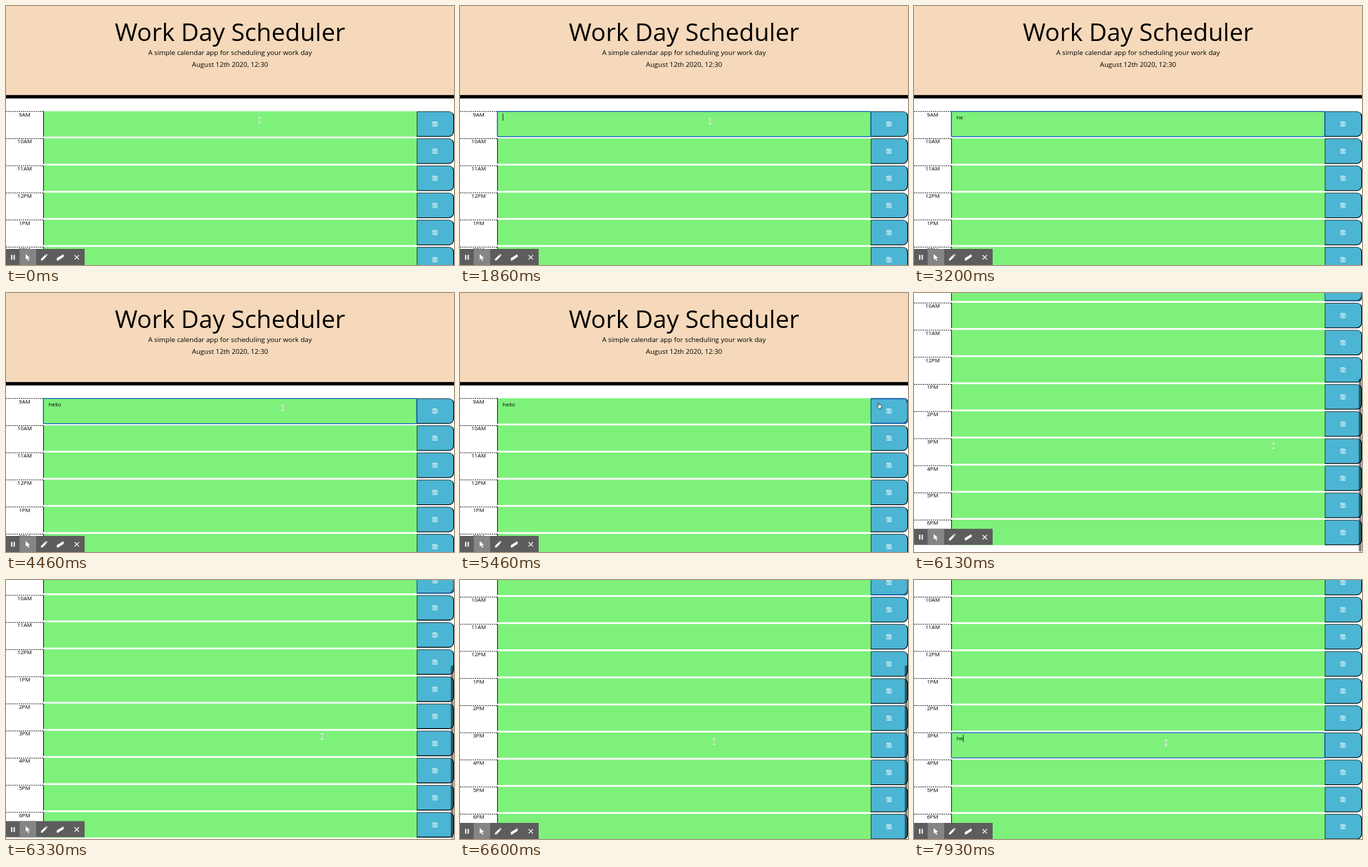
Animation of 638 by 370 pixels, one loop 8000 ms. Source, as an HTML page:

```html
<!DOCTYPE html>
<html lang="en">
<head>
<meta charset="utf-8">
<title>Work Day Scheduler</title>
<style>
  html, body { margin: 0; width: 100%; height: 100%; overflow: hidden; background: #fff; }
  svg { display: block; width: 638px; height: 370px; }
  text { font-family: "Open Sans", "Noto Sans", sans-serif; fill: #000; white-space: pre; }
  .mid { text-anchor: middle; }
  .small { font-size: 7.75px; }
  .lead { font-size: 9.69px; }
  .ring { fill: none; stroke: #1763c6; stroke-width: 1.2; }
</style>
</head>
<body>
<svg viewBox="0 0 638 370">
  <defs>
    <g id="disk" fill="none" stroke="#fff" stroke-width=".8">
      <path d="M-3.1-3.1H2L3.1-2V3.1H-3.1Z"/>
      <path d="M-1.7-3V-1H1.5V-3"/>
      <circle cy="1.1" r="1"/>
    </g>
    <g id="save">
      <path d="M585 .4H630.5a7 7 0 0 1 7 7V29a7 7 0 0 1-7 7H585Z" fill="#4bb5d3"/>
      <path d="M585.4 36V.5H630.5a7 7 0 0 1 5 2" fill="none" stroke="#333" stroke-width=".9"/>
      <path d="M585 35.8H630.5a7 7 0 0 0 7-7V7.4a7 7 0 0 0-2-5" fill="none" stroke="#000" stroke-width="1.1"/>
      <use href="#disk" x="611" y="18.2"/>
    </g>
  </defs>
  <rect width="638" height="370" fill="#fff"/>
  <g id="page">
    <rect width="638" height="127.2" fill="#f5d9ba"/>
    <rect y="127.2" width="638" height="4.9"/>
    <text class="mid" x="319" y="50" font-size="34.9">Work Day Scheduler</text>
    <text class="mid lead" x="319" y="69.6">A simple calendar app for scheduling your work day</text>
    <text class="mid lead" x="319" y="87.2">August 12th 2020, 12:30</text>
    <g id="rows"></g>
    <rect id="fieldRing" class="ring" x="53.3" width="531.6" height="36" rx="1"/>
    <path id="buttonRing" class="ring" d="M585.4 150.9H635l2.4 2.4V184l-2.4 2.4H585.4Z"/>
    <text id="first" class="small" x="60.8" y="161.7"></text>
    <text id="second" class="small" x="60.8"></text>
    <rect id="caret" width=".8" height="10.2"/>
  </g>
  <g id="toolbar">
    <rect y="347" width="112" height="23" fill="#5d5d5d"/>
    <rect x="19.5" y="347" width="23.5" height="23" fill="#858585"/>
    <g fill="#fff">
      <path d="M7.3 355.5h1.8v7H7.3ZM10.8 355.5h1.8v7h-1.8Z"/>
      <path d="M28 354.3V362.2L30 360.4 31.6 364 33.1 363.3 31.5 359.9H34.2Z"/>
      <path d="M49.8 363.6V361.4L55.6 355.6 57.7 357.7 51.9 363.6ZM56.2 355 57.2 354 59.2 356 58.2 357Z"/>
      <path d="M72.3 360.2 81.8 354.6 82.3 358.3 73.5 363.9 72.5 363.2Z"/>
    </g>
    <path d="M97.6 355.8l6.4 6.4m0-6.4l-6.4 6.4" stroke="#fff" stroke-width="1.2"/>
  </g>
  <rect id="thumb" x="633.4" width="4" height="247.5" rx="2" fill="#000"/>
  <g id="ibeam" fill="none">
    <path d="M-1.7-3.8Q0-3.8 0-2.8Q0-3.8 1.7-3.8M0-2.8V2.8M-1.7 3.8Q0 3.8 0 2.8Q0 3.8 1.7 3.8" stroke="#e9f5e7" stroke-width="1.5"/>
    <path d="M0-2.8V2.8" stroke="#8a9c88" stroke-width=".6"/>
  </g>
  <path id="hand" d="M-1.6-4.2q.9-.7 1.3.3V-1.6L2.6-.9Q3.4-.6 3.2.5L2.5 4.1H-1L-3.2.9Q-3.2-.1-2.2.2L-1.5.9Z"
        fill="#fff" stroke="#222" stroke-width=".7"/>
</svg>
<script>
const LOOP = 8000, TOP = 150.4, STEP = 38.75, MAX_SCROLL = 165;
const CHAR_TIMES = [2400, 2600, 3400, 3600, 3800];
const LATE_TIMES = [7730, 7900];
const POINTER = [
  [0, 361, 163], [1400, 361, 163], [1800, 356, 164.5], [4260, 356, 164.5],
  [5060, 597, 161], [5500, 597, 161], [5760, 512, 218.5], [6150, 512, 218.5],
  [6560, 362, 231], [6860, 359, 232.5]
];
const SCROLL = [[5600, 0], [5800, 82], [5930, 155], [6030, 177], [6130, 175.2], [6300, 168], [6500, MAX_SCROLL]];
const el = {};
for (const node of document.querySelectorAll("svg [id]")) el[node.id] = node;

const rowTop = i => TOP + i * STEP;
const hours = ["9AM", "10AM", "11AM", "12PM", "1PM", "2PM", "3PM", "4PM", "5PM", "6PM"];
el.rows.innerHTML = hours.map((hour, i) => `
  <g transform="translate(0 ${rowTop(i)})">
    <path d="M0 .3H53" stroke="#000" stroke-width=".8" stroke-dasharray="2 1"/>
    <text class="mid small" x="26.5" y="7.1">${hour}</text>
    <rect x="53" width="532" height="36.2" fill="#7ef17b"/>
    <path d="M53.4 0V36.2" stroke="#000" stroke-width=".9"/>
    <use href="#save"/>
  </g>`).join("");

function track(keys, t, col = 1, ease = x => x) {
  if (t <= keys[0][0]) return keys[0][col];
  for (let i = 1; i < keys.length; i++) {
    const a = keys[i - 1], b = keys[i];
    if (t < b[0]) return a[col] + (b[col] - a[col]) * ease((t - a[0]) / (b[0] - a[0]));
  }
  return keys[keys.length - 1][col];
}
const smooth = x => x * x * (3 - 2 * x);
const show = (node, on) => node.setAttribute("visibility", on ? "visible" : "hidden");
const move = (node, x, y) => node.setAttribute("transform", `translate(${x} ${y})`);
const typed = (times, t) => "hello".slice(0, times.filter(at => t >= at).length);

function render(t) {
  const scroll = track(SCROLL, t);
  move(el.page, 0, -scroll);
  move(el.toolbar, 0, -Math.max(0, scroll - MAX_SCROLL));

  const early = t >= 1660 && t < 5200, late = t >= 7060;
  const row = late ? 6 : 0;
  show(el.fieldRing, early || late);
  el.fieldRing.setAttribute("y", rowTop(row) + .2);
  show(el.buttonRing, t >= 5200 && t < 7060);

  el.first.textContent = typed(CHAR_TIMES, t);
  el.second.textContent = typed(LATE_TIMES, t);
  el.second.setAttribute("y", rowTop(6) + 11.3);

  // The blink restarts on focus and on every key.
  const start = late ? 7060 : 1660;
  const times = late ? LATE_TIMES : CHAR_TIMES;
  const last = Math.max(start, ...times.filter(at => at <= t));
  const field = late ? el.second : el.first;
  const width = field.textContent ? field.getComputedTextLength() : 0;
  show(el.caret, (early || late) && (t - last) % 1000 < 500);
  el.caret.setAttribute("x", 60.7 + width);
  el.caret.setAttribute("y", rowTop(row) + 3.2);

  el.thumb.setAttribute("y", Math.min(scroll, MAX_SCROLL) * 122 / MAX_SCROLL);
  el.thumb.setAttribute("opacity", .5 * track([[5599, 0], [5600, 1], [6950, 1], [7200, 0]], t));

  const x = track(POINTER, t, 1, smooth), y = track(POINTER, t, 2, smooth);
  const visible = t < 2400 || t >= 4260;
  const overButton = x > 585;
  move(el.ibeam, x, y);
  move(el.hand, x, y);
  show(el.ibeam, visible && !overButton);
  show(el.hand, visible && overButton);
}

const begin = performance.now();
function frame() {
  render((performance.now() - begin) % LOOP);
  requestAnimationFrame(frame);
}
render(0);
requestAnimationFrame(frame);
</script>
</body>
</html>
```
